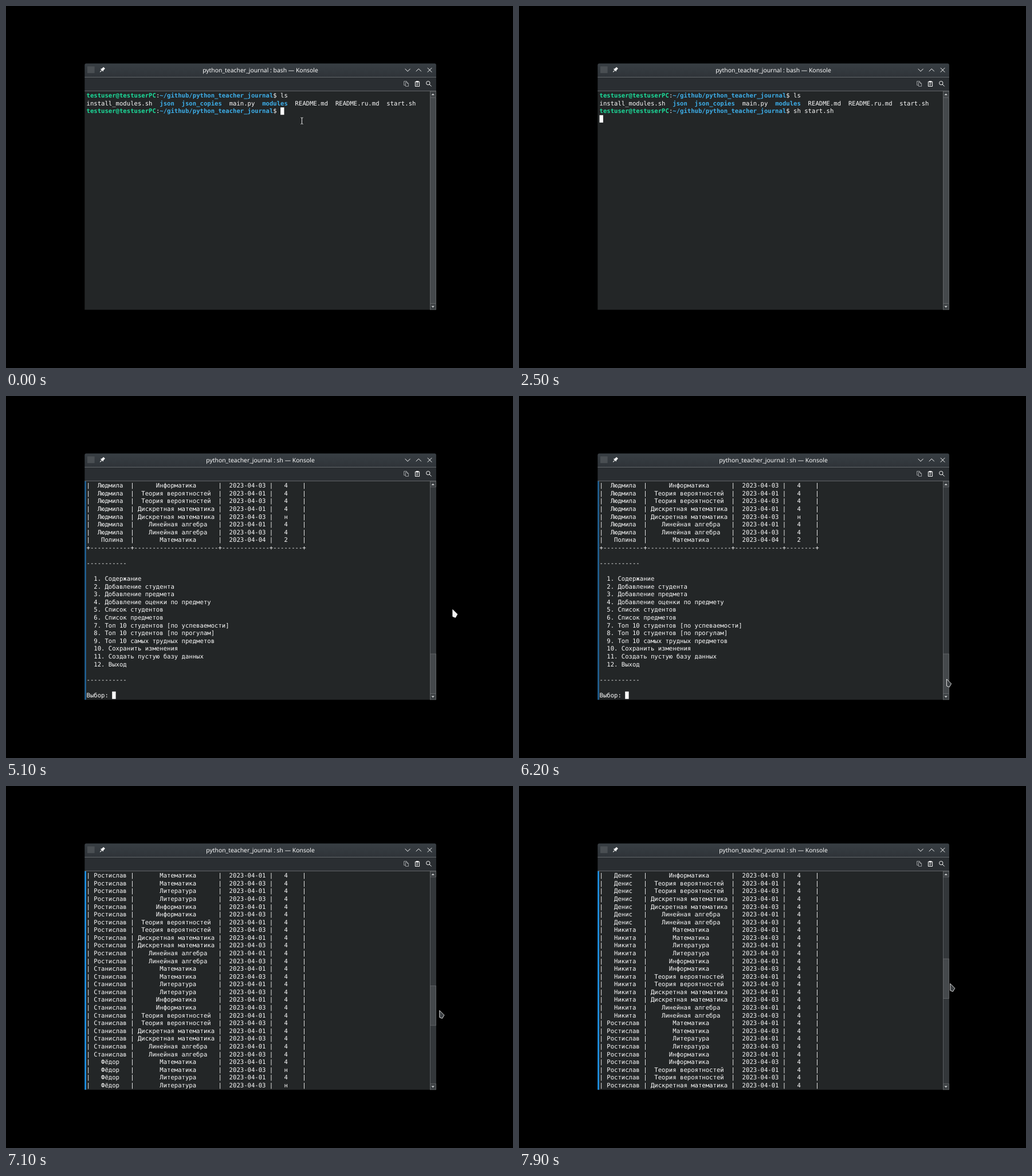
Animation of 885x633 px, one loop 8 s. Source, as an HTML page:

```html
<!DOCTYPE html>
<html lang="ru">
<head>
<meta charset="utf-8">
<title>Terminal session</title>
<style>
  html, body { margin: 0; width: 100%; height: 100%; overflow: hidden; background: #000; }
  svg { display: block; width: 885px; height: 633px; }
  text { text-rendering: geometricPrecision; fill: #fcfcfc; white-space: pre; }
  #rows text { font: 10.612px "DejaVu Sans Mono", monospace; }
  #title { font: 10.4px "Noto Sans", sans-serif; text-anchor: middle; }
  .user { fill: #1cdc9a; font-weight: bold; }
  .path { fill: #3daee9; font-weight: bold; }
  .icon { fill: none; stroke: #fcfcfc; stroke-width: 1; }
</style>
</head>
<body>
<svg viewBox="0 0 885 633">
  <defs>
    <linearGradient id="bar" x2="0" y2="1">
      <stop offset="0" stop-color="#383e43"/>
      <stop offset="1" stop-color="#2f3439"/>
    </linearGradient>
  </defs>
  <rect width="885" height="633"/>

  <!-- window frame -->
  <path d="M137.3 124.5V103.5Q137.3 100.6 140.2 100.6H748Q750.9 100.6 750.9 103.5V124.5Z" fill="url(#bar)"/>
  <rect x="137.3" y="124.5" width="613.6" height="24.5" fill="#2a2e32"/>
  <rect x="137.3" y="149" width="613.6" height="382.2" fill="#232627"/>
  <path d="M137.3 124.5H750.9M137.3 148.6H750.9" stroke="#6b6f72" stroke-width=".9"/>
  <rect x="142" y="105.5" width="12.6" height="11.8" fill="#4a4f53"/>
  <text id="title" x="444" y="115.8"></text>

  <!-- title bar and tool bar icons -->
  <g transform="translate(168 111.6) rotate(45)">
    <path d="M-2-5H2V-1L3.4 1.2H-3.4L-2-1Z" fill="#fcfcfc"/>
    <path class="icon" d="M0 1V5.4"/>
  </g>
  <path class="icon" stroke-width="1.1" d="M696.6 109.8L701.1 114.3L705.6 109.8M715.8 114.3L720.3 109.8L724.8 114.3M735.8 108.2L743.3 115.7M743.3 108.2L735.8 115.7"/>
  <path class="icon" style="stroke:#a9acae;stroke-width:.9" d="M697 138.4H694.7V131.6H699.4V133M697.4 133.4H700.6L702.6 135.4V140.4H697.4ZM700.4 133.6V135.6H702.4"/>
  <path class="icon" d="M714.4 132.3H721.6V140.5H714.4ZM716.2 136H719.8M716.2 138.2H718.6"/>
  <path d="M716 131H720V133.8H716Z" fill="#fcfcfc"/>
  <g class="icon"><circle cx="736.8" cy="134.7" r="3.2"/><path d="M739.1 137L742.6 140.5"/></g>

  <!-- scroll bar -->
  <rect x="740.3" y="149" width="10.6" height="382.2" fill="#33373a"/>
  <path d="M740.5 149V531.2" stroke="#66696c" stroke-width=".8"/>
  <g fill="#3a3e41" stroke="#66696c" stroke-width=".8">
    <rect x="740.6" y="149.2" width="9.9" height="9.8"/>
    <rect x="740.6" y="520.8" width="9.9" height="10"/>
    <rect id="thumb" x="740.6" width="9.9" fill="#45494c"/>
  </g>
  <path d="M742.4 155.9H748L745.2 152.9ZM742.4 524.4H748L745.2 527.4Z" fill="#c6c8c9"/>

  <rect id="mark" x="137.3" y="149" width="2.5"/>
  <g id="rows"></g>
  <rect id="caret" width="6.4" height="13" fill="#fcfcfc"/>

  <!-- mouse pointers -->
  <path id="beam" d="M-2-5.6Q0-5.6 0-4.6Q0-5.6 2-5.6M0-4.8V4.8M-2 5.6Q0 5.6 0 4.6Q0 5.6 2 5.6" fill="none" stroke="#fcfcfc" stroke-width=".9"/>
  <path id="arrow" d="M.5 .5L8.6 8.6L5.2 14.4L.5 12.6Z" stroke="#f4f4f4" stroke-width=".9" stroke-linejoin="round"/>
</svg>
<script>
const $ = id => document.getElementById(id);
const LOOP = 8000, ROWS = 28, LEFT = 140.5, TOP = 150.1, CELL_W = 6.389, CELL_H = 13.58;
const BRIGHT = '#1d99f3', DIM = '#20649a';

// Terminal content
const span = (cls, s) => `<tspan class="${cls}">${s}</tspan>`;
const prompt = span('user', 'testuser@testuserPC') + ':' +
  span('path', '~/github/python_teacher_journal') + '$ ';
const listing = ['install_modules.sh', span('path', 'json'), span('path', 'json_copies'), 'main.py',
  span('path', 'modules'), 'README.md', 'README.ru.md', 'start.sh'].join('  ');
const shell = typed => [prompt + 'ls', listing, prompt + typed];

const rule = '-'.repeat(11);
const menu = ['', rule, '', ...[
  'Содержание', 'Добавление студента', 'Добавление предмета', 'Добавление оценки по предмету',
  'Список студентов', 'Список предметов', 'Топ 10 студентов [по успеваемости]',
  'Топ 10 студентов [по прогулам]', 'Топ 10 самых трудных предметов', 'Сохранить изменения',
  'Создать пустую базу данных', 'Выход'
].map((s, i) => `  ${i + 1}. ${s}`), '', rule, '', 'Выбор: '];

const widths = [11, 23, 13, 8];
function center(s, width) {
  const gap = width - s.length;
  const left = s.length % 2 ? gap >> 1 : (gap + 1) >> 1;
  return ' '.repeat(left) + s + ' '.repeat(gap - left);
}
const tableRow = (...cells) => '|' + cells.map((s, i) => center(s, widths[i])).join('|') + '|';

const subjects = ['Математика', 'Литература', 'Информатика', 'Теория вероятностей',
  'Дискретная математика', 'Линейная алгебра'];
const students = ['Денис', 'Никита', 'Ростислав', 'Станислав', 'Фёдор', 'Людмила'];
const absent = (name, subject, day) => day === 3 &&
  (name === 'Фёдор' || name === 'Людмила' && subject === subjects[4]);

const table = students.flatMap(name => subjects.flatMap(subject => [1, 3].map(day =>
  tableRow(name, subject, '2023-04-0' + day, absent(name, subject, day) ? 'н' : '4'))));
table.push(tableRow('Полина', subjects[0], '2023-04-04', '2'),
  '+' + widths.map(w => '-'.repeat(w)).join('+') + '+');
const journal = [...table, ...menu];
const END = journal.length - ROWS;

// Each step overrides part of the state before it
const typing = s => ({ lines: shell(s), caret: [2, 53 + s.length] });
const scroll = (top, x, y) => ({
  top, markRows: Math.min(ROWS, END - top), markColor: BRIGHT, arrow: [x, y]
});
const steps = [
  [0, { ...typing(''), title: 'bash', top: 0, markRows: 0, beam: [516.5, 200.8] }],
  [1100, { ...typing('s'), beam: null }],
  [1200, typing('sh')],
  [1300, typing('sh ')],
  [1500, typing('sh s')],
  [1600, typing('sh st')],
  [1800, typing('sh sta')],
  [2100, typing('sh start.sh ')],
  [2500, { caret: [3, 0] }],
  [2900, { lines: menu, title: 'sh', caret: [18, 7] }],
  [3500, { lines: [...menu.slice(0, -1), 'Выбор: 1'], caret: [18, 8] }],
  [3900, { lines: journal, top: END, caret: [journal.length - 1, 7], markRows: ROWS, markColor: BRIGHT }],
  [4200, { markColor: DIM }],
  [5100, { arrow: [779.3, 373], arrowFill: '#f4f4f4' }],
  [5200, { arrow: [783.5, 427.5], arrowFill: '#3b3f42' }],
  [5500, { arrow: null, beam: [725, 496] }],
  [5700, { beam: [731, 496] }],
  [5800, { beam: [738.4, 495.5] }],
  [6000, { beam: null, arrow: [744.8, 495] }],
  [6200, { arrow: [746, 494.5] }],
  [6500, scroll(53, 754, 464)],
  [6700, scroll(40, 755.2, 432.3)],
  [6900, scroll(32, 756.3, 412)],
  [7100, scroll(24, 756.3, 392)],
  [7400, scroll(16, 755.2, 371.8)],
  [7700, scroll(10, 753.5, 357)],
  [7900, scroll(5, 752.2, 345)]
];

const rows = Array.from({ length: ROWS }, (_, i) => {
  const row = document.createElementNS('http://www.w3.org/2000/svg', 'text');
  row.setAttribute('x', LEFT);
  row.setAttribute('y', TOP + 10.1 + i * CELL_H);
  return $('rows').appendChild(row);
});

function set(id, attrs) {
  for (const key in attrs) $(id).setAttribute(key, attrs[key]);
}
function place(id, point) {
  set(id, point ? { visibility: 'visible', transform: `translate(${point})` } : { visibility: 'hidden' });
}

function draw(s) {
  $('title').textContent = `python_teacher_journal : ${s.title} — Konsole`;
  rows.forEach((row, i) => { row.innerHTML = s.lines[s.top + i] || ''; });
  const caretRow = s.caret[0] - s.top;
  place('caret', caretRow < ROWS && [LEFT + s.caret[1] * CELL_W, TOP + caretRow * CELL_H]);
  set('mark', {
    height: s.markRows === ROWS ? 382.2 : s.markRows * CELL_H,
    fill: s.markColor || 'none'
  });
  set('thumb', s.lines === journal
    ? { y: 451 - 2.48 * (END - s.top), height: 69.4 }
    : { y: 160.2, height: 360 });
  place('beam', s.beam);
  place('arrow', s.arrow);
  set('arrow', { fill: s.arrowFill || 'none' });
}

let shown = -1;
function tick(now) {
  const t = now % LOOP;
  const count = steps.filter(([at]) => at <= t).length;
  if (count !== shown) {
    shown = count;
    draw(Object.assign({}, ...steps.slice(0, count).map(step => step[1])));
  }
}

const start = performance.now();
(function frame() {
  tick(performance.now() - start);
  requestAnimationFrame(frame);
})();
</script>
</body>
</html>
```
